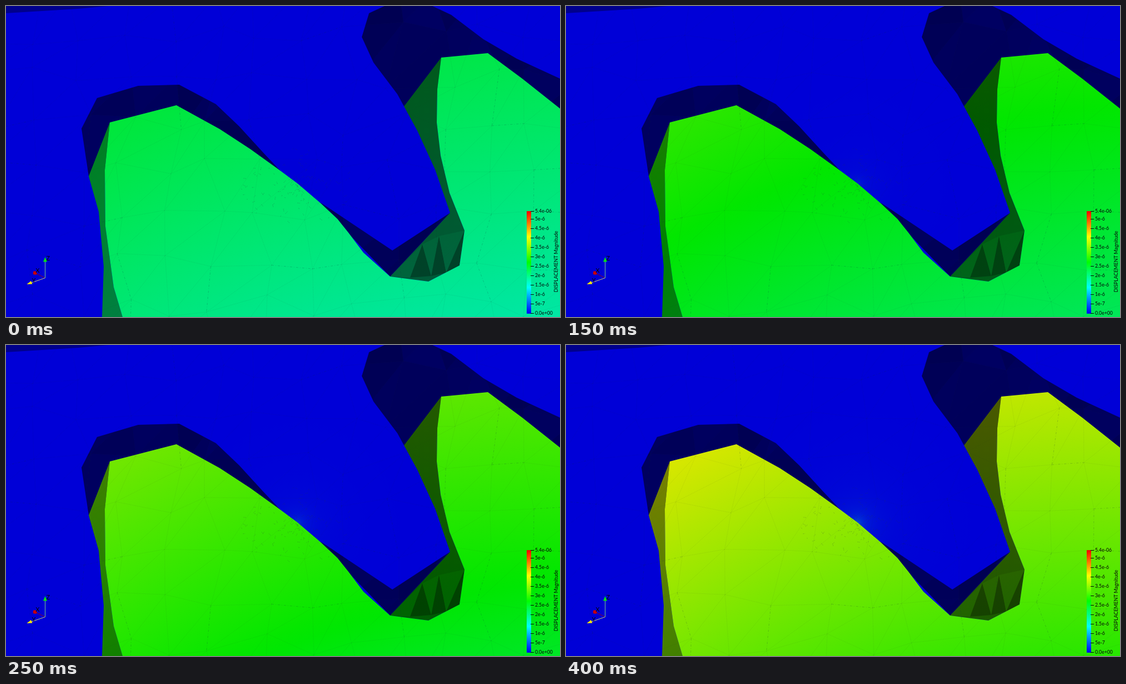
These frames come from a looping animation (998x561 px, 450 ms). An HTML page with a canvas:

```html
<!DOCTYPE html>
<html lang="en">
<head>
<meta charset="utf-8">
<title>Displacement field</title>
<style>
  html, body { margin: 0; width: 100%; height: 100%; overflow: hidden; background: #0000d7; }
  canvas { display: block; width: 998px; height: 561px; }
</style>
</head>
<body>
<canvas id="stage" width="998" height="561"></canvas>
<script>
const ctx = document.getElementById('stage').getContext('2d');
const WIDTH = 998, HEIGHT = 561, STEP = 50, STEPS = 9;
const INK = '#050508';
const pivot = { x: 1150, y: 2150, near: 1580, far: 2180, tip: 2165 };
const contact = { x: 525, y: 321 };

const shape = points => new Path2D(`M${points}Z`);
const fill = (path, color) => { ctx.fillStyle = color; ctx.fill(path); };

let seed = 17;
const random = () => (seed = seed * 16807 % 2147483647) / 2147483647;
const spread = size => (random() - .5) * size;

// Outlines overlap: back faces first, then side walls, then the front face.
const front = shape('187,210 307,179 385,222 440,258 490,294 525,320 566,355 597,384 617,409 644,445 692,488 761,497 817,468 826,405 799,337 783,270 776,210 777,150 784,93 868,85 930,131 998,185 998,561 210,561 194,507 179,397 178,296');
const rim = shape('0,0 185,0 130,5 0,13');
const back = new Path2D();
for (const outline of [
  '149,307 136,221 164,166 238,144 312,142 378,177 420,217 462,263 495,298 300,300',
  '717,181 705,159 662,102 641,56 654,13 682,0 768,0 802,16 860,60 920,95 998,131 998,190 868,120',
  '566,354 696,441 800,373 692,488 597,390'
]) back.addPath(shape(outline));
const leftWall = shape('149,307 187,210 178,296 179,397 194,507 210,561 173,561 176,470 167,371');
const rightWall = shape('717,181 784,93 777,150 776,210 783,270 799,337 826,405 817,468 761,497 692,488 800,373 773,295 741,225');
const fan = '692,488 728,490 750,430 766,487 780,415 793,481 826,405 817,468'.split(' ');

// One jittered grid gives the element edges and the facets of the back faces.
const CELL = 82, COLS = 14, ROWS = 9;
const nodes = Array.from({ length: COLS * ROWS }, (_, i) => [
  (i % COLS - .4) * CELL + spread(44),
  (Math.floor(i / COLS) - .4) * CELL + spread(44)
]);
const facets = [];
const edges = new Path2D(), heavyEdges = new Path2D();
for (let row = 0; row < ROWS - 1; row++) {
  for (let col = 0; col < COLS - 1; col++) {
    const i = row * COLS + col;
    const [a, b, c, d] = [i, i + 1, i + COLS, i + COLS + 1].map(n => nodes[n]);
    for (const corners of [[a, b, c], [b, d, c]])
      facets.push({ path: shape(corners.join(' ')), shade: random() * .17 });
    for (const end of [b, c]) {
      const edge = new Path2D(`M${a}L${end}`);
      (random() < .17 ? heavyEdges : edges).addPath(edge);
    }
    edges.addPath(new Path2D(`M${b}L${c}`));
  }
}

// Small element edges, refined toward the contact point.
const contactEdges = new Path2D();
for (let i = 0; i < 140; i++) {
  const angle = random() * 2 * Math.PI, radius = 105 * random();
  const x = contact.x + radius * Math.cos(angle);
  const y = contact.y + 4 + .65 * radius * Math.sin(angle);
  contactEdges.addPath(new Path2D(`M${x},${y}l${spread(10)},${spread(10)}`));
}

// The body turns about a distant pivot, so displacement grows with radius and time.
function fieldGradient(step, light) {
  const { x, y, near, far, tip } = pivot;
  const gradient = ctx.createRadialGradient(x, y, near, x, y, far);
  const stops = 24;
  for (let i = 0; i <= stops; i++) {
    const radius = near + (far - near) * i / stops;
    const hue = 240 - (105 + 8.9 * step) * radius / tip;
    gradient.addColorStop(i / stops, `hsl(${hue} 100% ${light * 50}%)`);
  }
  return gradient;
}

function drawGlow(step) {
  const { x, y } = contact, reach = 230, stops = 20;
  const gradient = ctx.createRadialGradient(x, y, 0, x, y, reach);
  for (let i = 0; i <= stops; i++) {
    const at = (i / stops) ** 2;
    const green = 700 / (at * reach + 7) - 3;
    gradient.addColorStop(at, `rgb(0 ${green * step / 8} 215)`);
  }
  ctx.fillStyle = gradient;
  ctx.fillRect(x - reach, y - reach, 2 * reach, 2 * reach);
}

function drawBack() {
  fill(rim, '#00008c');
  fill(back, '#000062');
  ctx.save();
  ctx.clip(back);
  for (const { path, shade } of facets) fill(path, `rgb(0 0 0 / ${shade})`);
  ctx.restore();
}

function drawWalls(step) {
  fill(leftWall, fieldGradient(step, .5));
  fill(rightWall, fieldGradient(step, .35));
  for (let i = 0; i < fan.length - 2; i++)
    fill(shape(fan.slice(i, i + 3).join(' ')), fieldGradient(step, i % 2 ? .26 : .39));
}

function strokeLines(path, color, dash = [], width = .7) {
  ctx.strokeStyle = color;
  ctx.lineWidth = width;
  ctx.setLineDash(dash);
  ctx.stroke(path);
}

function label(text, x, y, size, align = 'center') {
  ctx.font = `${size}px Lato, sans-serif`;
  ctx.textAlign = align;
  ctx.textBaseline = 'middle';
  ctx.fillStyle = INK;
  ctx.fillText(text, x, y);
}

function drawLegend() {
  const bar = ctx.createLinearGradient(0, 554, 0, 370);
  for (let i = 0; i <= 24; i++) bar.addColorStop(i / 24, `hsl(${240 - 10 * i} 100% 50%)`);
  ctx.fillStyle = bar;
  ctx.fillRect(938, 370, 8, 185);
  const tick = (value, text) => {
    const y = 554.5 - value * 34.1;
    label(text, 953, y, 8.7, 'left');
    ctx.fillRect(945, Math.floor(y), 6, 1);
  };
  tick(0, '0.0e+00');
  tick(.5, '5e-7');
  for (let value = 1; value <= 5; value += .5) tick(value, `${value}e-6`);
  tick(5.4, '5.4e-06');
  ctx.save();
  ctx.translate(991, 461);
  ctx.rotate(-Math.PI / 2);
  label('DISPLACEMENT Magnitude', 0, 0, 8.9);
  ctx.restore();
}

function drawAxes() {
  const axis = (name, x, y, line, lineColor, tip, tipColor) => {
    strokeLines(new Path2D(`M70.5,490.5L${line}`), lineColor, [], 1);
    fill(shape(tip), tipColor);
    label(name, x, y, 10.5);
  };
  axis('X', 57, 478, '53,482', '#8c0028', '49,479 53,478 56,482 54,485 49,484', '#c80000');
  axis('Y', 50, 496, '45,499.5', '#c8c878', '37.5,502 45,496 47.5,501.5', '#ffee00');
  axis('Z', 76, 456, '70.5,460', '#78c88c', '70.5,453 74,461.5 67,461.5', '#00e614');
}

function draw(step) {
  ctx.fillStyle = '#0000d7';
  ctx.fillRect(0, 0, WIDTH, HEIGHT);
  drawGlow(step);
  drawBack();
  drawWalls(step);
  fill(front, fieldGradient(step, .905));
  strokeLines(edges, 'rgb(40 50 50 / .12)', [2, 1]);
  strokeLines(heavyEdges, 'rgb(20 50 60 / .28)', [4, 3, 1, 3]);
  strokeLines(contactEdges, 'rgb(40 60 60 / .36)', [2, 1]);
  drawLegend();
  drawAxes();
}

const begin = performance.now();
let shown = -1;
function update() {
  const step = Math.floor((performance.now() - begin) / STEP) % STEPS;
  if (step !== shown) draw(shown = step);
  requestAnimationFrame(update);
}
update();
</script>
</body>
</html>
```
